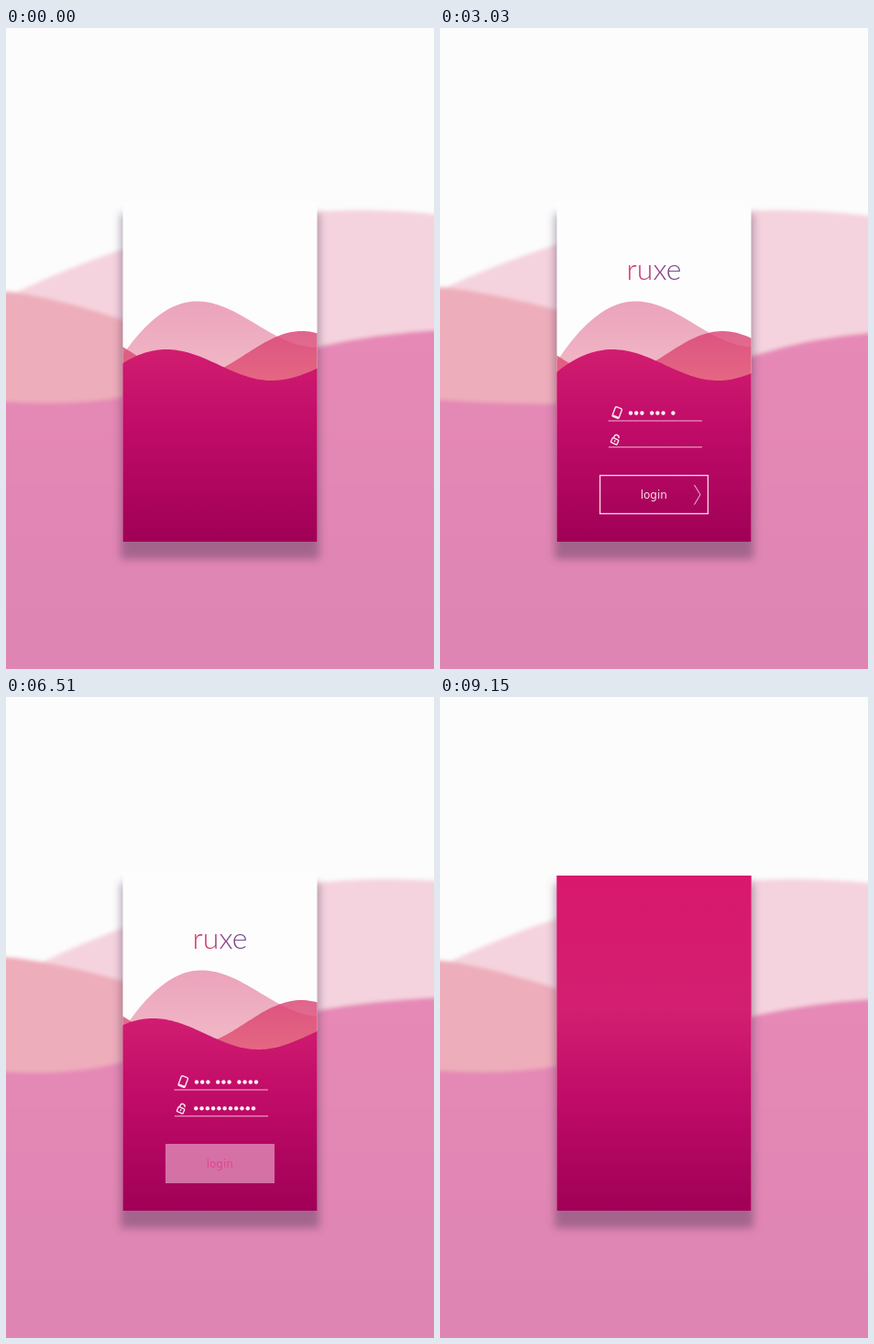
Write an HTML page that moves like this. It is 467 by 700 pixels and loops after 9.18 s.

```html
<!DOCTYPE html>
<html lang="en">
<head>
<meta charset="utf-8">
<title>Login waves</title>
<style>
  html, body { margin: 0; width: 100%; height: 100%; overflow: hidden; background: #fcfcfc; }
  svg { display: block; width: 100%; height: 100%; }
  .logo { font: 300 32px Lato, "Open Sans", sans-serif; text-anchor: middle; }
  .login { font: 12px "DejaVu Sans", sans-serif; text-anchor: middle; }
</style>
</head>
<body>
<svg viewBox="0 0 467 700">
  <defs>
    <linearGradient id="deep" gradientUnits="userSpaceOnUse" x1="0" y1="195" x2="0" y2="561">
      <stop offset="0" stop-color="#d9186c"/>
      <stop offset=".4" stop-color="#d31f71"/>
      <stop offset=".65" stop-color="#c10c69"/>
      <stop offset="1" stop-color="#a00057"/>
    </linearGradient>
    <linearGradient id="hill" gradientUnits="userSpaceOnUse" x1="0" y1="298" x2="0" y2="385">
      <stop offset="0" stop-color="#eba3bb"/>
      <stop offset="1" stop-color="#f2bac8"/>
    </linearGradient>
    <linearGradient id="rose" gradientUnits="userSpaceOnUse" x1="0" y1="331" x2="0" y2="385">
      <stop offset="0" stop-color="#d83a6e"/>
      <stop offset="1" stop-color="#e0506f"/>
    </linearGradient>
    <linearGradient id="ink" gradientUnits="userSpaceOnUse" x1="204" y1="0" x2="263" y2="0">
      <stop offset="0" stop-color="#e0335f"/>
      <stop offset=".35" stop-color="#c23c7c"/>
      <stop offset=".6" stop-color="#8a4088"/>
      <stop offset="1" stop-color="#6b4a8c"/>
    </linearGradient>
    <linearGradient id="floor" gradientUnits="userSpaceOnUse" x1="0" y1="330" x2="0" y2="700">
      <stop offset="0" stop-color="#e689b6"/>
      <stop offset="1" stop-color="#de85b4"/>
    </linearGradient>
    <filter id="soft" filterUnits="userSpaceOnUse" x="-40" y="150" width="550" height="620">
      <feGaussianBlur stdDeviation="2.2"/>
    </filter>
    <filter id="shade" filterUnits="userSpaceOnUse" x="90" y="160" width="290" height="460">
      <feGaussianBlur stdDeviation="5"/>
    </filter>
    <clipPath id="card"><rect x="127.5" y="195" width="212" height="366"/></clipPath>
  </defs>

  <rect width="467" height="700" fill="#fcfcfc"/>
  <g filter="url(#soft)">
    <path id="farPale" fill="#f5d3de"/>
    <path id="farSalmon" fill="#edadba"/>
    <path id="farPink" fill="url(#floor)"/>
  </g>
  <rect x="125" y="203" width="217" height="377" fill="#463252" opacity=".4" filter="url(#shade)"/>
  <rect x="127.5" y="190" width="212" height="371" fill="#fdfdfd"/>

  <g clip-path="url(#card)">
    <path id="pale" fill="url(#hill)"/>
    <path id="red" fill="url(#rose)" fill-opacity=".78"/>
    <path id="front" fill="url(#deep)"/>
  </g>

  <text id="logo" class="logo" x="233.5" y="274.5" fill="url(#ink)">ruxe</text>

  <g stroke="#f0b4d2" stroke-width="1.1">
    <line id="lineTop" x1="183.5" y1="429" y2="429"/>
    <line id="lineLow" x2="286" y1="457.8" y2="457.8"/>
  </g>
  <g id="icons" fill="none" stroke="#fbe8f2" stroke-width="1.4">
    <g transform="translate(193.3 420) rotate(21)">
      <rect x="-3.8" y="-5.7" width="7.6" height="11.4" rx="1.4"/>
      <path d="M-3.5 4.7H3.5" stroke-width="1.8"/>
    </g>
    <g transform="translate(191.5 449.3) rotate(24)">
      <rect x="-3.6" y="-.6" width="7.2" height="5.4" rx=".8"/>
      <path d="M-2.5 -.8V-2.6a2.5 2.5 0 0 1 5 0M0 1v2"/>
    </g>
  </g>
  <g id="dots" fill="#fdeff6"></g>

  <g id="button">
    <rect id="fill" x="174" y="488" width="119" height="43" fill="#f0b9d6"/>
    <g id="outline" fill="none" stroke="#f8dcea">
      <rect x="174.6" y="488.6" width="117.8" height="41.8" stroke-width="1.3"/>
      <path d="M277.5 499L284 509.5L277.5 520.5" stroke-width=".9"/>
    </g>
    <text id="label" class="login" x="233.3" y="514">login</text>
  </g>
  <circle id="touch" fill="#f0b5d3"/>
</svg>

<script>
const LOOP = 9180;
const LEFT = 127, RIGHT = 340, BOTTOM = 562;
const $ = id => document.getElementById(id);
const set = (id, attrs) => {
  for (const name in attrs) $(id).setAttribute(name, attrs[name]);
};
const clamp = v => Math.min(1, Math.max(0, v));
const span = (t, a, b) => clamp((t - a) / (b - a));
const ease = (t, a, b) => { const p = span(t, a, b); return p * p * (3 - 2 * p); };
const mix = (a, b, p) => a + (b - a) * p;

// Area under y = curve(x), closed along the given bottom edge.
function area(curve, x0, x1, bottom, step = 3) {
  let d = `M${x0} ${bottom}`;
  for (let x = x0; x <= x1; x += step) d += `L${x} ${curve(x).toFixed(2)}`;
  return d + `L${x1} ${curve(x1).toFixed(2)}V${bottom}Z`;
}

// Cosine to the right of the crest; an optional steeper parabola to its left.
const swell = (crest, top, amp, half, steep) => x => {
  const d = x - crest;
  return top + (d < 0 && steep ? steep * d * d : amp * (1 - Math.cos(Math.PI * d / half)));
};

const phoneDots = [...Array(10).keys()].map(i => ({
  x: 208 + i * 6.2 + Math.min(2, Math.floor(i / 3)) * 4.6, y: 420.5, at: 2240 + i * 130
}));
const passDots = [...Array(11).keys()].map(i => ({
  x: 207.3 + i * 6.27, y: 449.3, at: 4050 + i * 125
}));
const dots = [...phoneDots, ...passDots].map(dot => {
  const node = document.createElementNS("http://www.w3.org/2000/svg", "circle");
  node.setAttribute("cx", dot.x);
  node.setAttribute("cy", dot.y);
  $("dots").append(node);
  return { node, at: dot.at };
});

function drawBackdrop(a) {
  const peak = 390 - 26 * Math.sin(a + .17);
  set("farPale", { d: area(x => 199 + 6.4e-4 * (x - peak) ** 2, -30, 498, 480, 8) });

  const bob = 5 * Math.cos(2 * a) - 3.7 * Math.cos(a - .52);
  const slope = x => 286 + bob + (28 + 1.4 * bob) * Math.max(0, x / 127) ** 1.35;
  set("farSalmon", { d: area(slope, -30, 200, 480, 8) });

  const sway = -11.5 * Math.sin(2 * a);
  const yStart = 408 - .2 * sway, yLeft = 403 + .75 * sway;
  const yRight = 347 + sway, yEnd = 330 + .3 * sway;
  set("farPink", {
    d: `M-30 ${yStart}H0Q70 ${yStart + 5} 127 ${yLeft}` +
       `C200 ${yLeft - 12} 270 ${yRight + 22} 345 ${yRight}` +
       `Q405 ${mix(yRight, yEnd, .78)} 467 ${yEnd}H500V740H-30Z`
  });
}

function drawCardWaves(t, a) {
  const lift = 205 * ease(t, 7500, 8700);
  const draw = (id, curve) => set(id, { d: area(x => curve(x) - lift, LEFT, RIGHT, BOTTOM) });
  draw("pale", swell(208 + 5 * ease(t, 0, 2800), 298.5, 25, 130, .009));
  draw("red", swell(317 - 9 * Math.sin(a - .7), 331, 25, 122));
  draw("front", swell(175 + 15 * Math.sin(a), 351, 17, 115, .0067));
}

function drawForm(t) {
  const logoOut = span(t, 7050, 7700);
  set("logo", {
    transform: `translate(0 ${-40 * logoOut ** 2})`,
    opacity: ease(t, 250, 950) * (1 - ease(t, 7300, 7700))
  });

  const grown = ease(t, 850, 1690) * (1 - ease(t, 6600, 7360));
  set("lineTop", { x2: 183.5 + 102.5 * grown, opacity: grown > 0 ? 1 : 0 });
  set("lineLow", { x1: 286 - 102 * grown, opacity: grown > 0 ? 1 : 0 });

  const leaving = 1 - ease(t, 6550, 6950);
  set("icons", { opacity: ease(t, 900, 1450) * leaving });
  set("dots", { opacity: leaving });
  for (const { node, at } of dots) node.setAttribute("r", 2.2 * span(t, at - 60, at));
}

function drawButton(t) {
  const pressed = ease(t, 5800, 6250);
  const drop = 5 * (1 - ease(t, 550, 1150)) + 17 * ease(t, 6900, 7420);
  set("button", {
    transform: `translate(0 ${drop})`,
    opacity: ease(t, 550, 1150) * (1 - ease(t, 7240, 7560))
  });
  set("fill", { opacity: .6 * pressed });
  set("outline", { opacity: 1 - pressed });
  const channel = (from, to) => Math.round(mix(from, to, pressed));
  set("label", { fill: `rgb(${channel(248, 222)},${channel(220, 72)},${channel(234, 146)})` });

  const glide = ease(t, 5380, 5850), ripple = ease(t, 5850, 6200);
  set("touch", {
    cx: mix(211, 229, glide), cy: mix(488, 506, glide),
    r: 10 + 9 * ripple,
    opacity: .65 * ease(t, 5380, 5580) * (1 - ripple)
  });
}

function render(now) {
  const t = now % LOOP;
  const angle = 2 * Math.PI * t / LOOP;
  drawBackdrop(angle);
  drawCardWaves(t, angle);
  drawForm(t);
  drawButton(t);
}

const start = performance.now();
function tick() {
  render(performance.now() - start);
  requestAnimationFrame(tick);
}
tick();
</script>
</body>
</html>
```
